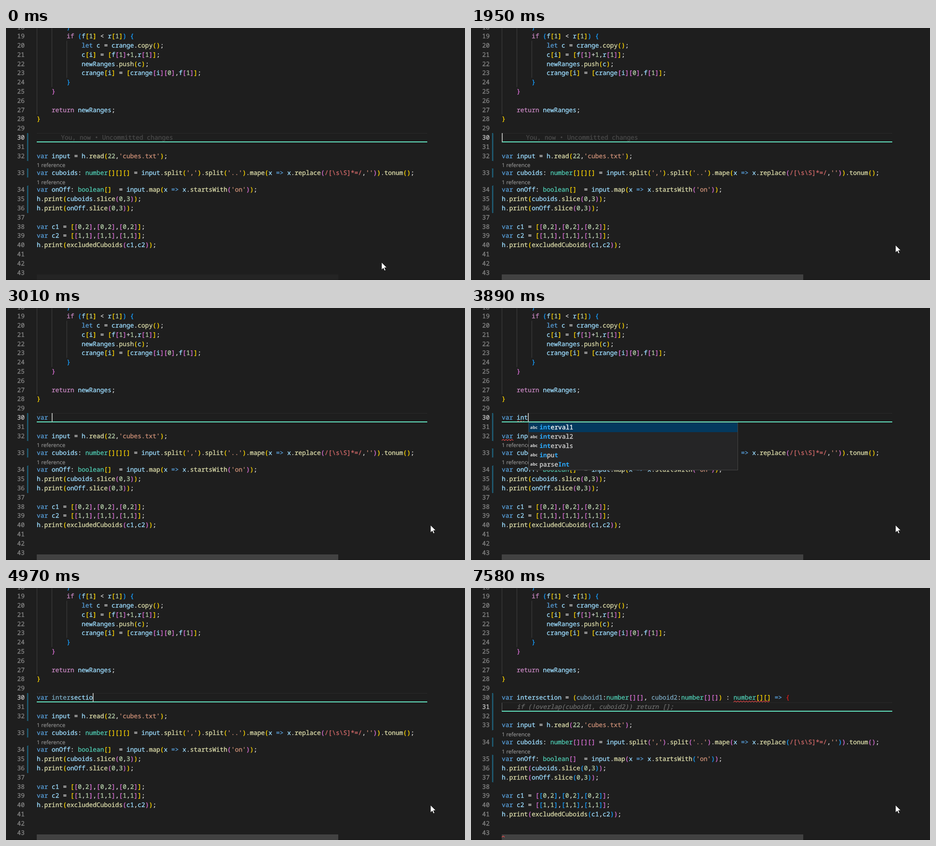
Recreate the animation shown at these times as an HTML page. Size 985 by 542 pixels, loop 8000 ms.

```html
<!DOCTYPE html>
<html lang="en">
<head>
<meta charset="utf-8">
<title>Code editor</title>
<style>
html, body { margin: 0; width: 100%; height: 100%; overflow: hidden; background: #1e1e1e; }
svg { display: block; }
text {
  font: 13.37px "Noto Sans Mono", "DejaVu Sans Mono", monospace;
  white-space: pre; text-rendering: geometricPrecision;
  stroke-width: .35px;
}
text, tspan { fill: currentColor; stroke: currentColor; }
.dim { fill-opacity: .667; stroke-opacity: .667; }
.lens { font: 11.6px "Open Sans", "Noto Sans", sans-serif; color: #999; stroke-width: .15px; }
.abc { font: bold 9px "Open Sans", "Noto Sans", sans-serif; color: #ddd; stroke: none; }
.ghost { font-style: italic; color: #696969; }
.match { font-weight: bold; color: #2aaaff; stroke: none; }
</style>
</head>
<body>
<svg width="985" height="542" viewBox="0 0 985 542">
  <defs>
    <pattern id="hatch" width="3" height="3" patternUnits="userSpaceOnUse">
      <path d="M-1 1L1 -1M0 3L3 0M2 4L4 2" stroke="#1f8db8" stroke-width="1.1"/>
    </pattern>
  </defs>
  <g id="stage"></g>
</svg>
<script>
const LOOP = 8000, X0 = 66, CW = 8.022, LH = 19.79, Y30 = 235.4, LENS = 16.65;
const BRACKETS = ['#ffd700', '#da70d6', '#179fff'];

const upper = [
  '        }',
  '        if (f[1] < r[1]) {',
  '            let c = crange.copy();',
  '            c[i] = [f[1]+1,r[1]];',
  '            newRanges.push(c);',
  '            crange[i] = [crange[i][0],f[1]];',
  '        }',
  '    }',
  '',
  '    return newRanges;',
  '}',
  ''
];
const lower = [
  '',
  "var input = h.read(22,'cubes.txt');",
  "var cuboids: number[][][] = input.split(',').split('..').mape(x => x.replace(/[\\s\\S]*=/,'')).tonum();",
  "var onOff: boolean[]  = input.map(x => x.startsWith('on'));",
  'h.print(cuboids.slice(0,3));',
  'h.print(onOff.slice(0,3));',
  '',
  'var c1 = [[0,2],[0,2],[0,2]];',
  'var c2 = [[1,1],[1,1],[1,1]];',
  'h.print(excludedCuboids(c1,c2));',
  '', '', ''
];
const typed = 'var intersection = (cuboid1:number[][], cuboid2:number[][]) : number[][] => {';
const hint = 'if (!overlap(cuboid1, cuboid2)) return [];';
const keyTimes = [2740, 2810, 2940, 3010, 3750, 3820, 3890, 3960, 4030, 4430,
  4560, 4760, 4830, 4900, 4970, 5040, 5380, 5910];
const words = {
  v: 'var void value values interval1 interval2 intervals overlap valid vector even move'.split(' '),
  i: 'interval1 interval2 intervals input parseInt if import includes index is split'.split(' ')
};
const caretOn = [[70, 480], [960, 1450], [1950, 2480], [2740, 6390], [6590, 7580]];

const ACCEPT = 6590, ENTER = 6990, CHECKED = 7180;
const stage = document.getElementById('stage');
const within = (t, a, b) => t >= a && t < b;
const colX = c => X0 + c * CW;
const rowY = n => Y30 + (n - 30) * LH + (n > 33 ? 2 : n > 32 ? 1 : 0) * LENS;
const baseline = y => Math.round(y + 4.6);
const esc = s => s.replace(/&/g, '&amp;').replace(/</g, '&lt;').replace(/>/g, '&gt;');
const rect = (x, y, w, h, fill, more = '') =>
  `<rect x="${x}" y="${y}" width="${w}" height="${h}" fill="${fill}" ${more}/>`;
const label = (x, y, s, attrs) => `<text x="${x}" y="${baseline(y)}" ${attrs}>${esc(s)}</text>`;

let depth = 0;

function tokenColor(s, after) {
  if (/^(var|let|=>)$/.test(s)) return '#569cd6';
  if (/^(if|return)$/.test(s)) return '#c586c0';
  if (/^(number|boolean)$/.test(s)) return '#4ec9b0';
  if (/^[a-z]/i.test(s)) return after[0] === '(' ? '#dcdcaa' : '#9cdcfe';
  if (/^\d/.test(s)) return '#b5cea8';
  if (s[0] === "'") return '#ce9178';
  if (s.length > 2 && s[0] === '/') return '#d16969';
  if (/[([{]/.test(s)) return BRACKETS[depth++ % 3];
  if (/[)\]}]/.test(s)) return BRACKETS[--depth % 3];
  return '#d4d4d4';
}

// One highlighted line; faint = dimmed leading letters of the new name.
function code(s, y, { faint = 0, unused = false, badBrace = false } = {}) {
  let out = '';
  const put = (col, part, color, dim) => {
    if (part) out += `<tspan x="${colX(col)}" color="${color}"${dim ? ' class="dim"' : ''}>${esc(part)}</tspan>`;
  };
  for (const m of s.matchAll(/\/\[.*?=\/|'[^']*'|=>|[a-z]\w*|\d+|\S/gi)) {
    const part = m[0], i = m.index;
    let color = tokenColor(part, s.slice(i + part.length));
    if (badBrace && part === '{') color = '#e01f1f';
    if (faint && i === 4) {
      put(i, part.slice(0, faint), color, true);
      put(i + faint, part.slice(faint), color);
    } else put(i, part, color, unused && /^cuboid\d/.test(part));
  }
  return `<text y="${baseline(y)}">${out}</text>`;
}

function squiggle(x, y, w) {
  let d = `M${x} ${y + 10}`;
  for (let i = 1; i * 3.1 <= w + 1; i++) d += `L${x + i * 3.1} ${y + (i % 2 ? 7.6 : 10)}`;
  return `<path d="${d}" fill="none" stroke="#f14c4c" stroke-width="1.1"/>`;
}

// Letters of word hit by the query, or null.
function fuzzy(word, query) {
  const low = word.toLowerCase(), at = low.indexOf(query), hits = new Set();
  let pos = Math.max(at, 0);
  for (const ch of query) {
    pos = low.indexOf(ch, pos);
    if (pos < 0) return null;
    hits.add(pos++);
  }
  return hits;
}

function popup(query, col) {
  const x = Math.round(colX(col) + 0.8), top = 246;
  const found = words[query[0]].filter(w => fuzzy(w, query));
  let out = rect(x + 0.5, top + 0.5, 449, Math.round(found.length * LH + 3), '#252526', 'stroke="#454545"');
  found.forEach((w, i) => {
    const y = top + 1 + (i + 0.5) * LH, hits = fuzzy(w, query);
    if (!i) out += rect(x + 1, top + 1, 448, 20, '#04395e');
    out += `<text class="abc" x="${x + 4}" y="${Math.round(y + 3)}">abc</text>`;
    const letters = [...w].map((ch, k) => `<tspan x="${x + 24 + k * CW}"${hits.has(k) ? ' class="match"' : ''}>${ch}</tspan>`);
    out += `<text y="${baseline(y)}" color="${i ? '#d4d4d4' : '#fff'}">${letters.join('')}</text>`;
  });
  return out;
}

function pointer(t) {
  const ease = p => p * p * (3 - 2 * p);
  const step = (a, len) => ease(Math.min(8, Math.floor((t - a) / len) + 1) / 8);
  const mix = (a, b, p) => a + (b - a) * p;
  let x = 806, y = 504;
  if (t >= 70) { const p = step(70, 68.5); x = mix(806, 71, p); y = mix(504, 210, p); }
  if (t >= 690) { x = 71; y = t < 750 ? 214 : 217; }
  if (t >= 960) { x = 60; y = 221; }
  if (t >= 1036) { const p = step(1036, 64.8); x = mix(60, 911, p); y = mix(221, 467, p); }
  return `<path transform="translate(${x} ${y})" d="M0 0V16L3.8 12.5 6.2 18 8.7 16.9 6.4 11.5H11.3Z" fill="#fff" stroke="#111" stroke-width=".8"/>`;
}

function picture(t) {
  const entered = t >= ENTER, shift = entered ? LH : 0, active = entered ? 31 : 30;
  const count = t >= ACCEPT ? typed.length : keyTimes.filter(k => t >= k).length;
  const y = Y30 + shift, top = Math.round(y - 9.4);
  const number = (n, yy) => label(24, yy, String(n), `color="${n === active ? '#c6c6c6' : '#858585'}"`);
  let out = '';

  // indent guides
  for (const [x, a, b] of [[66, 0, 186], [98, 0, 127], [130, 27.5, 107]])
    out += rect(x, a, 1, b - a, '#404040');
  if (entered) out += rect(66, 246, 1, 19, '#606060');

  // current line and change bars
  out += rect(66, top, 838, 1, '#2a2a2a');
  const bars = [[226, 60 + shift], [302 + shift, 19.5], [339 + shift, 59]];
  for (const [a, h] of bars) out += rect(45, a, 3, h, 'url(#hatch)');

  depth = 3;
  upper.forEach((s, i) => { out += number(18 + i, rowY(18 + i)) + code(s, rowY(18 + i)); });

  out += number(30, Y30);
  const faint = within(t, 4430, 5450) ? 5 : within(t, 5450, ACCEPT) ? 12 : 0;
  depth = 0;
  out += code(typed.slice(0, count), Y30, { faint, unused: t >= CHECKED, badBrace: true });
  if (t < 2740) out += label(118, Y30, 'You, now • Uncommitted changes', 'color="#484848"');
  if (within(t, 5110, ACCEPT)) out += label(colX(count), Y30, typed.slice(count), 'class="ghost"');
  if (entered) out += number(31, y);
  if (t >= CHECKED) out += label(colX(4), y, hint, 'class="ghost"');

  depth = t >= ACCEPT ? 1 : 0;
  lower.forEach((s, i) => {
    const yy = rowY(31 + i) + shift;
    out += number(31 + i + (entered ? 1 : 0), yy) + code(s, yy);
  });
  for (const ly of [299.4, 335.8])
    out += `<text class="lens" x="66" y="${Math.round(ly + shift)}">1 reference</text>`;

  // errors
  if (within(t, 3290, 4430) || within(t, 6260, CHECKED)) out += squiggle(66, rowY(32) + shift, 24);
  if (within(t, 3820, 4430)) out += squiggle(98, Y30, 16);
  if (t >= CHECKED) out += squiggle(colX(62), Y30, 79);

  out += rect(66, top + 18, 838, 2, '#64e6c2');
  if (caretOn.some(([a, b]) => within(t, a, b)))
    out += rect(Math.round(colX(entered ? 4 : count)), top, 2, 19, '#aeafad');

  if (within(count, 1, 4)) out += popup(typed.slice(0, count), count);
  if (within(count, 5, 11)) out += popup(typed.slice(4, count), count);

  out += rect(0, 540, 985, 2, '#191919');
  const shown = t < 70 ? 0.17 : t < 140 ? 0.7 : 1;
  out += rect(66, 530, 647, 12, '#797979', `fill-opacity="${0.4 * shown}"`);
  if (t >= CHECKED) out += squiggle(66, rowY(42) + shift, 8);
  return out + pointer(t);
}

let last = '';
function frame() {
  const next = picture(performance.now() % LOOP);
  if (next !== last) stage.innerHTML = last = next;
  requestAnimationFrame(frame);
}
document.querySelector('svg').style.color = '#d4d4d4';
frame();
</script>
</body>
</html>
```
